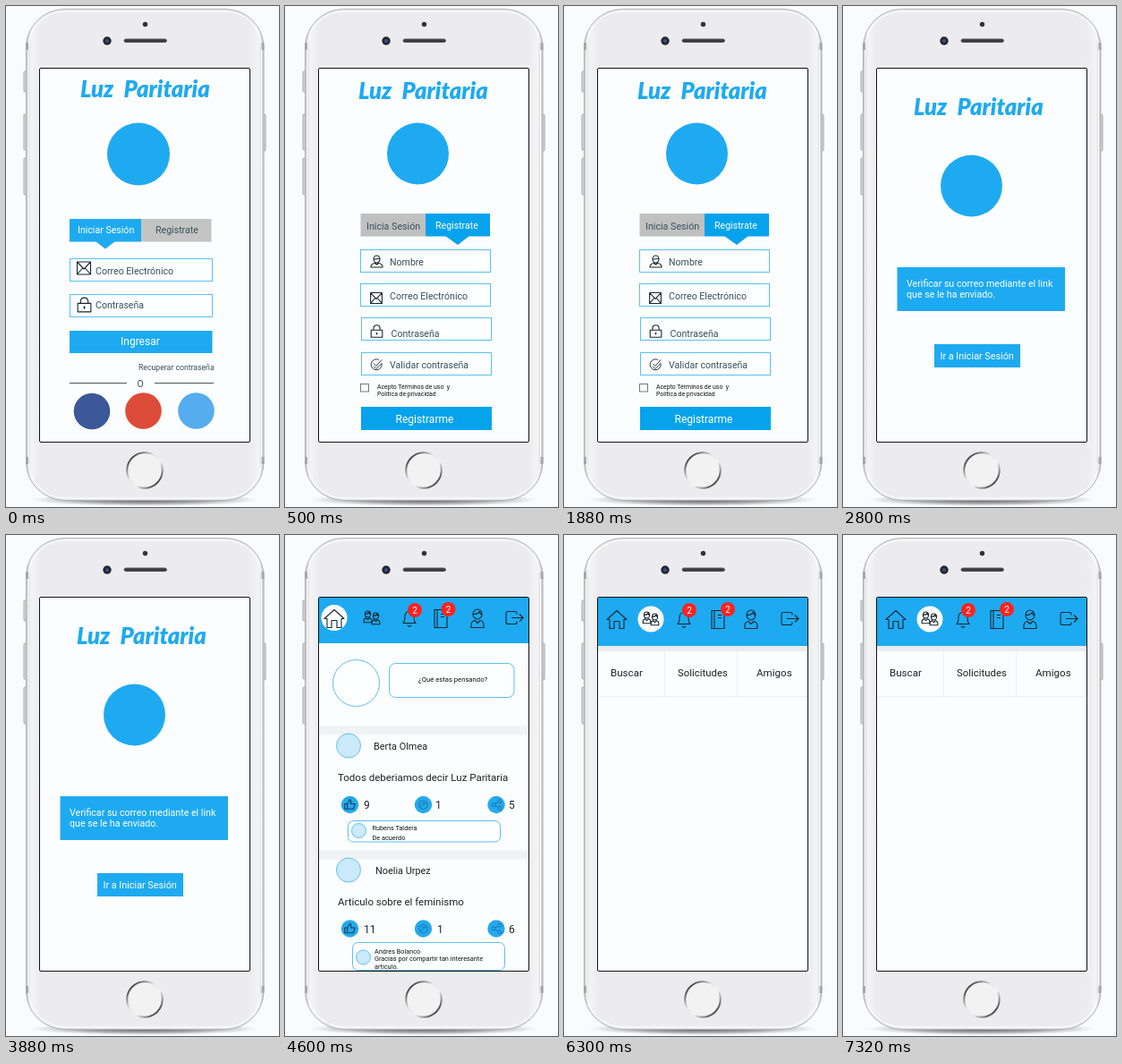
An HTML page for the animation above (8000 ms loop, 305x560 px).

```html
<!DOCTYPE html>
<html lang="es">
<head>
<meta charset="utf-8">
<style>
html, body { margin: 0; width: 100%; height: 100%; overflow: hidden; background: #f9fbfd; }
svg { display: block; width: 305px; height: 560px; font-family: Roboto, Arial, sans-serif; }
text { white-space: pre; }
.title { font: italic 900 25.5px Lato, sans-serif; word-spacing: 6px; }
</style>
</head>
<body>
<svg id="stage" viewBox="0 0 305 560">
  <defs>
    <linearGradient id="shell">
      <stop offset="0" stop-color="#c4c4c6"/><stop offset=".02" stop-color="#f4f4f5"/>
      <stop offset=".06" stop-color="#ececee"/><stop offset=".94" stop-color="#ececee"/>
      <stop offset=".98" stop-color="#f4f4f5"/><stop offset="1" stop-color="#c4c4c6"/>
    </linearGradient>
    <linearGradient id="metal" x2="1" y2="1">
      <stop offset=".1" stop-color="#333"/><stop offset=".4" stop-color="#e4e4e4"/>
      <stop offset=".6" stop-color="#f4f4f4"/><stop offset=".9" stop-color="#333"/>
    </linearGradient>
    <radialGradient id="shade">
      <stop offset="0" stop-color="#444" stop-opacity=".9"/><stop offset=".6" stop-color="#777" stop-opacity=".6"/>
      <stop offset="1" stop-color="#999" stop-opacity="0"/>
    </radialGradient>
    <clipPath id="screen"><rect x="38" y="70" width="234" height="417"/></clipPath>
  </defs>
</svg>
<script>
const BLUE = '#1eaaf1', SKY = '#5bc0f2', PALE = '#cbeafb', INK = '#35525f', BAND = '#f0f2f4';

const text = (x, y, s, size, fill = '#222', more = '') =>
  `<text x="${x}" y="${y}" font-size="${size}" fill="${fill}" ${more}>${s}</text>`;
const box = (x, y, w, h, fill, stroke = 'none', r = 0) =>
  `<rect x="${x}" y="${y}" width="${w}" height="${h}" rx="${r}" fill="${fill}" stroke="${stroke}"/>`;
const disc = (x, y, r, fill, stroke = 'none') =>
  `<circle cx="${x}" cy="${y}" r="${r}" fill="${fill}" stroke="${stroke}"/>`;
const path = (d, fill, stroke = 'none') => `<path d="${d}" fill="${fill}" stroke="${stroke}"/>`;

// Icon outlines, centred on the origin
const icons = {
  home: 'M-11 0L0-10 11 0H8V10H3V2H-3V10H-8V0Z',
  person: 'M-5-5A5 5.5 0 1 1 5-5A5 5.5 0 1 1-5-5ZM-5-5Q1-5 2-8Q3-5 5-5M-7 10V7Q-7 3-3 2L0 5 3 2Q7 3 7 7V10Z',
  bust: 'M-3.5-3A3.5 4 0 1 1 3.5-3A3.5 4 0 1 1-3.5-3ZM-3.5-3Q1-3 3.5-4M-6.5 6V5Q-6 2-2 1.5L0 3 2 1.5Q6 2 6.5 5V6Z',
  bell: 'M-7 5Q-5 3-5-2Q-5-8 0-8Q5-8 5-2Q5 3 7 5ZM-2 7Q0 11 2 7M0-8V-10',
  book: 'M-7-10H7V10H-7ZM-4-10V10M0-5H4M0-2H4',
  exit: 'M3-4V-5Q3-7 1-7H-7Q-9-7-9-5V5Q-9 7-7 7H1Q3 7 3 5V4M-3 0H10M6-4L10 0 6 4',
  mail: 'M-7.5-7H7.5V7H-7.5ZL0 1 7.5-7M-7.5 7L-1.5 0M7.5 7L1.5 0',
  lock: 'M-7-2H7V7H-7ZM-4-2V-4Q-4-8 0-8Q4-8 4-4V-2M0 1V4M-1 2H1',
  check: 'M6-1A6 6 0 1 1 3-5M-3-1L0 2 6-5M-3 2L0 5 6-1',
  like: 'M-6-1H-3V5H-6ZM-3-1L0-6Q2-5 1-1H6L4 5H-3',
  mute: 'M-5 0A5 5 0 1 1 5 0A5 5 0 1 1-5 0M-4 3L4-3M-2-2H2',
  share: 'M-5 0A2 2 0 1 1-1 0A2 2 0 1 1-5 0M2-4A2 2 0 1 1 6-4A2 2 0 1 1 2-4M2 4A2 2 0 1 1 6 4A2 2 0 1 1 2 4M-1-1L2-3M-1 1L2 3'
};
const icon = (name, x, y, scale = 1, color = '#16262f', width = 1.1) =>
  `<path d="${icons[name]}" transform="translate(${x} ${y}) scale(${scale})" fill="none" stroke="${color}" stroke-width="${width / scale}" stroke-linejoin="round"/>`;

const brand = (x, y, cx, cy, r) =>
  `<text class="title" x="${x}" y="${y}" fill="${BLUE}">Luz Paritaria</text>` + disc(cx, cy, r, BLUE);
const field = (x, y, w, h, label, tx, ty) => box(x, y, w, h, '#fdfeff', SKY) + text(tx, ty, label, 10.6, INK);

const login = () =>
  brand(83, 102, 148, 165.5, 35) +
  box(71, 238, 80, 25.5, BLUE) + box(151, 238, 78.5, 25.5, '#c4c4c4') + path('M100 263H122L111 271.5Z', BLUE) +
  text(80, 254, 'Iniciar Sesión', 10.6, '#fff') + text(167, 254, 'Registrate', 10.6, INK) +
  field(71.5, 282.5, 159, 25, 'Correo Electrónico', 100, 299.5) + icon('mail', 87, 293) +
  field(71.5, 322.5, 159, 25, 'Contraseña', 100, 338) + icon('lock', 87.5, 334.5, 1.05) +
  box(71, 363, 159.5, 25, BLUE) + text(128, 379, 'Ingresar', 12, '#fff') +
  text(148, 407, 'Recuperar contraseña', 8.7, INK) +
  path('M71 421.5H135M166 421.5H232', 'none', '#555') + text(146.5, 425.5, 'O', 10.5, INK) +
  disc(96, 453, 20.3, '#3b5998') + disc(153.5, 452.5, 20.3, '#dd4b39') + disc(212.5, 452.5, 20.3, '#55acee');

const signup = () =>
  brand(82, 104, 148.5, 165, 34.5) +
  box(84.5, 232, 72.5, 25.5, '#c0c0c0') + box(157, 232, 72, 25.5, '#06a3ec') + path('M179 257H206L193 267Z', '#06a3ec') +
  text(91, 250, 'Inicia Sesión', 10.7, INK) + text(168, 249, 'Registrate', 10.6, '#fff') +
  field(84.5, 272.5, 145, 25, 'Nombre', 117, 290) + icon('bust', 102.5, 286) +
  field(84.5, 310.5, 145, 25, 'Correo Electrónico', 117, 328) + icon('mail', 102, 326.5, .85) +
  field(85.5, 348.5, 145, 25, 'Contraseña', 118.5, 370) + icon('lock', 102.5, 364, .9) +
  field(85.5, 387.5, 145, 25, 'Validar contraseña', 117, 404.5) + icon('check', 102, 400.5, 1, '#16262f', .9) +
  box(84.5, 422.5, 9, 8.5, '#fff', '#777') +
  text(103, 428, 'Acepto Términos de uso  y', 6.9, '#111') + text(103, 436, 'Política de privacidad', 6.9, '#111') +
  box(85, 448, 146, 26, '#06a3ec') + text(123.5, 465.5, 'Registrarme', 12, '#fff');

const verify = () =>
  brand(79, 122, 143.5, 201, 34.5) +
  box(60.5, 292, 187.5, 49, BLUE) +
  text(71, 314, 'Verificar su correo mediante el link', 10.65, '#fff') +
  text(71, 326, 'que se le ha enviado.', 10.65, '#fff') +
  box(102, 378, 96, 26, BLUE) + text(108.5, 395, 'Ir a Iniciar Sesión', 10.8, '#fff');

const badge = (x, y) => disc(x, y, 8, '#fb2420') + text(x, y + 3.5, '2', 10, '#fff', 'text-anchor="middle"');
function header(bottom, xs, y, active, spot, b1, b2) {
  const [home, pair, bell, book, person, exit] = xs;
  return box(38, 70, 234, bottom - 70, BLUE) + disc(active, spot, 14.5, '#fff') +
    icon('home', home, y) + icon('person', pair - 4.5, y - 2, .62) + icon('person', pair + 4.5, y, .62) +
    icon('bell', bell, y) + icon('book', book, y) + icon('person', person, y) + icon('exit', exit, y - 1) +
    badge(b1, 84) + badge(b2, 83);
}

const post = (y, name, nx, body, likes, shares, mid, row) =>
  box(38, y, 234, 10, BAND) + disc(71, y + 22, 13.5, PALE, SKY) +
  text(nx, y + 26.5, name, 10.9) + text(59, y + 61.5, body, 11.5) +
  [['like', 72.5, 88, likes], ['mute', 154.5, mid, 1], ['share', 236, 250, shares]].map(([kind, x, tx, n]) =>
    disc(x, row, 9.7, '#25a9ec') +
    icon(kind, x, row, .95, kind == 'like' ? '#123d58' : '#1780b9') +
    text(tx, row + 4.5, n, 12)).join('');

const comment = (x, y, w, h, cy, lines, tx, ty, gap) =>
  box(x, y, w, h, '#fdfeff', SKY, 6) + disc(x + 12, cy, 8, PALE, SKY) +
  lines.map((s, i) => text(tx, ty + i * gap, s, 7.3, '#111')).join('');

const feed = () =>
  header(121, [55, 97, 139, 174, 215, 256], 93.5, 55, 92.5, 145, 182.5) +
  disc(79.5, 165.5, 26, '#fdfeff', SKY) + box(116.5, 143.5, 139.5, 38, '#fdfeff', SKY, 7) +
  text(149, 164, '¿Qué estas pensando?', 7.7, '#111') +
  post(213.5, 'Berta Olmea', 99, 'Todos deberiamos decir Luz Paritaria', 9, 5, 168, 301.5) +
  comment(70.5, 319.5, 170, 23.5, 330.5, ['Rubens Taldera', 'De acuerdo'], 97.5, 329.5, 11.5) +
  post(352.5, 'Noelia Urpez', 101, 'Articulo sobre el feminismo', 11, 6, 170, 440) +
  comment(75.5, 455.5, 170, 31, 472, ['Andres Bolanco', 'Gracias por compartir tan interesante', 'articulo.'], 100, 467.5, 8.8);

const friends = () =>
  header(124, [59, 97, 134, 172, 209, 252], 94.5, 97, 94, 140, 183) +
  box(38, 124, 234, 6, '#e9edf0') +
  path('M112.5 130V180M193.5 130V180M38 180.5H272', 'none', '#edf0f2') +
  text(52, 157.5, 'Buscar', 11.6) + text(127, 157.5, 'Solicitudes', 11.4) + text(215, 157.5, 'Amigos', 11.6);

const phone = () =>
  '<ellipse cx="155" cy="552" rx="128" ry="7" fill="url(#shade)"/>' +
  [[20, 73, 23], [20, 121, 40], [20, 170, 41], [287, 121, 41]].map(([x, y, h]) => box(x, y, 3, h, '#d5d5d6', '#aaa', 1)).join('') +
  box(22.5, 3.5, 265.5, 549, 'url(#shell)', '#b2b2b4', 43) +
  box(25, 6, 260.5, 544, 'none', '#fff', 41) +
  [45, 508].map(y => box(22, y - 4, 3, 8, '#a6a6a8') + box(285.5, y - 4, 3, 8, '#a6a6a8')).join('') +
  disc(155.5, 20.5, 2.7, '#333') + disc(113, 39, 4.7, '#25262d') + disc(113, 39, 2, '#31538e') +
  box(132, 37, 47.5, 3.5, '#3c3c3c', '#555', 2) +
  '<circle cx="155" cy="519" r="19.7" fill="#f2f2f3" stroke="url(#metal)" stroke-width="2"/>' +
  box(37.5, 69.5, 235, 418, '#fcfdfe', '#111', 1.5);

const scenes = [[0, login], [500, signup], [2800, verify], [4600, feed], [6300, friends]];
const stage = document.getElementById('stage');
stage.innerHTML += phone() + scenes.map(([, draw]) =>
  `<g class="scene" clip-path="url(#screen)" visibility="hidden">${draw()}</g>`).join('');
const views = [...stage.querySelectorAll('.scene')];

function tick() {
  const t = performance.now() % 8000;
  const now = scenes.filter(([start]) => start <= t).length - 1;
  views.forEach((v, i) => v.setAttribute('visibility', i == now ? 'visible' : 'hidden'));
  requestAnimationFrame(tick);
}
tick();
</script>
</body>
</html>
```
